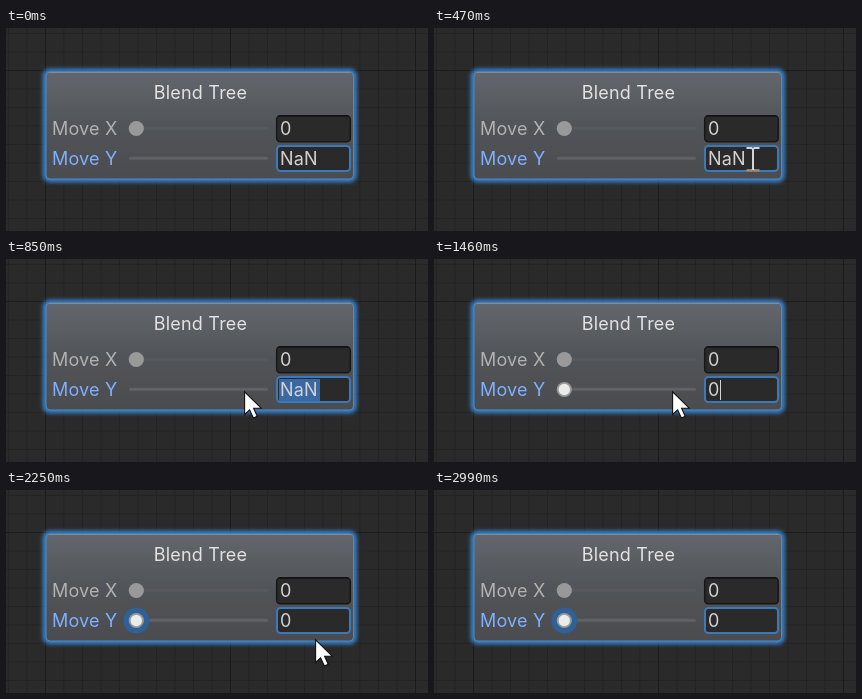
Animation, 422 px wide and 203 px high, one loop 4.51 s. Source, as an HTML page:

```html
<!DOCTYPE html>
<html lang="en">
<head>
<meta charset="utf-8">
<title>Blend Tree</title>
<style>
  html, body { margin: 0; width: 100%; height: 100%; overflow: hidden; background: #2a2a2a; }
  svg { display: block; width: 422px; height: 203px; }
  text { font: 18px Inter, "Open Sans", sans-serif; letter-spacing: .2px; fill: #d2d2d2; }
  .title { fill: #e2e2e2; text-anchor: middle; }
  .label { fill: #b2b2b2; }
  .label.focused { fill: #7fb0ff; }
  .glow { fill: none; stroke: #3a8ee0; stroke-width: 5; filter: blur(2px); }
  .field { fill: #2a2a2a; stroke: #171717; stroke-width: 1.5; }
  .field.focused { stroke: #3a79bb; stroke-width: 2; }
  #beam { mix-blend-mode: difference; }
</style>
</head>
<body>
<svg viewBox="0 0 422 203">
  <defs>
    <pattern id="minor" x="2" y="5" width="18.5" height="18.5" patternUnits="userSpaceOnUse">
      <path d="M0 .5H18.5M.5 0V18.5" stroke="#232323"/>
    </pattern>
    <pattern id="major" x="39" y="42" width="185" height="185" patternUnits="userSpaceOnUse">
      <path d="M0 .5H185M.5 0V185" stroke="#1b1b1b"/>
    </pattern>
    <linearGradient id="panel" x2="0" y2="1">
      <stop offset="0" stop-color="#63676d"/>
      <stop offset=".5" stop-color="#515458"/>
      <stop offset="1" stop-color="#4b4c4f"/>
    </linearGradient>
  </defs>

  <rect width="422" height="203" fill="#2a2a2a"/>
  <rect width="422" height="203" fill="url(#minor)"/>
  <rect width="422" height="203" fill="url(#major)"/>

  <rect class="glow" x="39.5" y="43.5" width="308.5" height="108" rx="4"/>
  <rect x="40" y="44" width="307.5" height="107" rx="4" fill="url(#panel)" stroke="#4a8cc8"/>
  <path d="M43 44.5H345" stroke="#858b92"/>
  <text class="title" x="194.5" y="71">Blend Tree</text>

  <text class="label" x="46" y="107">Move X</text>
  <rect x="123" y="98.8" width="139" height="3" rx="1.5" fill="#58595c"/>
  <circle cx="130.3" cy="100.5" r="7.6" fill="#999"/>
  <rect class="field" x="270.7" y="87.7" width="73.6" height="26" rx="3.5"/>
  <path d="M273 88H342" stroke="#0e0e0e"/>
  <text x="274" y="107">0</text>

  <text class="label focused" x="46" y="137">Move Y</text>
  <rect x="123" y="128.8" width="139" height="3" rx="1.5" fill="#616265"/>
  <circle id="halo" cx="130.3" cy="130.5" r="13" fill="#2f6096"/>
  <circle id="knob" cx="130.3" cy="130.5" r="7.6" fill="#999"/>
  <circle id="hover" cx="130.3" cy="130.5" r="5.7" fill="#ebebeb"/>
  <rect class="field focused" x="271" y="118" width="73" height="25" rx="3.5"/>
  <rect id="selection" y="120" height="22" fill="#3a68a5"/>
  <text id="value" x="274" y="137"></text>
  <path id="caret" d="M286.5 121V141" stroke="#d2d2d2"/>

  <path id="arrow" d="M.6 .8V23.5L5.6 18.8L9.4 27L13.2 25.3L9.6 17.2H17.2Z"
        fill="#fff" stroke="#111" stroke-width="1.1"/>
  <path id="beam" d="M-6.5 -11H-1.5L0 -10L1.5 -11H6.5M0 -10V10M-6.5 11.5H-1.5L0 10.5L1.5 11.5H6.5"
        fill="none" stroke="#fff" stroke-width="2"/>
</svg>
<script>
  const LOOP = 4510;

  // Pointer poses, each held until the next: [time, shape, x, y]
  const poses = [
    [0, ""],
    [140, "arrow", 405, 164], [190, "arrow", 330, 160], [230, "arrow", 250, 153],
    [280, "arrow", 190, 146], [330, "arrow", 167, 140], [370, "arrow", 215, 137],
    [420, "beam", 285, 133], [470, "beam", 319, 131],
    [610, "beam", 330, 131], [660, "beam", 334, 131], [700, "beam", 316, 131],
    [750, "beam", 288, 131], [800, "arrow", 252, 131], [850, "arrow", 238, 132],
    [1830, "arrow", 258, 135], [1870, "beam", 281, 137], [1920, "beam", 293, 137],
    [2060, "beam", 299, 138], [2110, "beam", 304, 141], [2160, "arrow", 306, 146],
    [2200, "arrow", 308, 148], [2250, "arrow", 309, 149], [2300, "arrow", 287, 156],
    [2340, "arrow", 252, 163], [2390, "arrow", 222, 167], [2440, "arrow", 209, 168],
    [2810, "arrow", 212, 171], [2850, "arrow", 226, 180], [2900, "arrow", 247, 190],
    [2940, "arrow", 269, 200], [2990, ""]
  ];

  const el = id => document.getElementById(id);
  const show = (id, on) => { el(id).style.display = on ? "" : "none"; };

  function placePointer(t) {
    const [, shape, x, y] = poses.findLast(pose => pose[0] <= t);
    for (const id of ["arrow", "beam"]) show(id, id === shape);
    if (shape) el(shape).setAttribute("transform", `translate(${x} ${y})`);
  }

  function draw(t) {
    const typed = t >= 1460, committed = t >= 2060;
    placePointer(t);

    const start = t < 800 ? 287.5 : 273;
    el("selection").setAttribute("x", start);
    el("selection").setAttribute("width", 314 - start);
    show("selection", t >= 750 && !typed);

    el("value").textContent = typed ? "0" : "NaN";
    show("caret", typed && !committed);
    show("knob", typed);
    show("hover", typed && t < 1870 || committed);
    show("halo", committed);
  }

  function tick() {
    draw(performance.now() % LOOP);
    requestAnimationFrame(tick);
  }
  tick();
</script>
</body>
</html>
```
